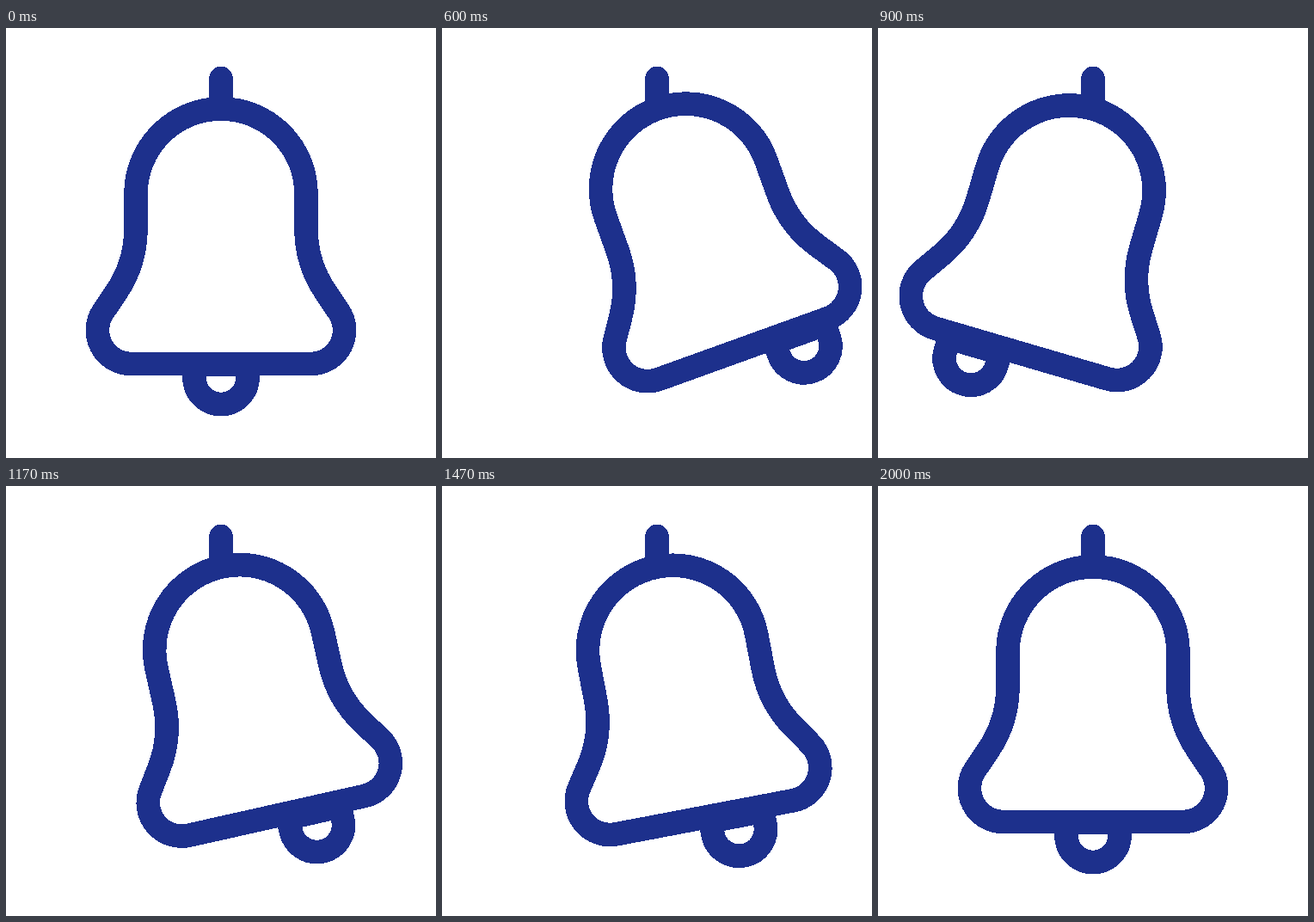
An HTML page for the animation above (2100 ms loop, 500 by 500 pixels).

```html
<!DOCTYPE html>
<html lang="en">
<head>
<meta charset="utf-8">
<title>Ringing bell</title>
<style>
  html, body { margin: 0; width: 100%; height: 100%; overflow: hidden; background: #fff; }
  svg { display: block; width: 100%; height: 100%; }
  path { fill: none; stroke: #1d308c; stroke-width: 27.6; shape-rendering: crispEdges; }
</style>
</head>
<body>
<svg viewBox="0 0 500 500">
  <path d="M250 94V58.5" stroke-linecap="round"/>
  <g id="bell">
    <path id="clapper" d="M219 391H281V406.5A31 31 0 0 1 219 406.5Z"/>
    <path d="M250 94A99 99 0 0 1 349 193V233A132 132 0 0 0 371.6 307L386.9 329.7
             A39 39 0 0 1 354.5 390.5H145.5A39 39 0 0 1 113.1 329.7L128.4 307
             A132 132 0 0 0 151 233V193A99 99 0 0 1 250 94Z"/>
  </g>
</svg>
<script>
  const LOOP = 2100, FPS = 30;
  const bell = document.getElementById('bell');
  const clapper = document.getElementById('clapper');

  // pose: [bell angle, clapper x, clapper y]
  const REST = [0, 0, 0], RIGHT = [-20, 68, 5], LEFT = [20, -67, 6];
  const keys = [
    [333.3, REST], [580, RIGHT], [826.7, LEFT], [1073.3, RIGHT],
    [1320, LEFT], [1566.7, RIGHT], [2000, REST]
  ];

  // cubic-bezier(PULL, 0, 1 - PULL, 1)
  const PULL = 0.72;
  function ease(x) {
    let lo = 0, hi = 1;
    for (let i = 0; i < 30; i++) {
      const s = (lo + hi) / 2, r = 1 - s;
      const bx = 3 * s * r * (PULL * r + (1 - PULL) * s) + s * s * s;
      if (bx < x) lo = s;
      else hi = s;
    }
    return lo * lo * (3 - 2 * lo);
  }

  function poseAt(t) {
    const next = keys.findIndex(([time]) => time > t);
    if (next < 1) return REST;
    const [t0, from] = keys[next - 1], [t1, to] = keys[next];
    const p = ease((t - t0) / (t1 - t0));
    return from.map((v, i) => v + (to[i] - v) * p);
  }

  function draw(now) {
    // hold each pose for one step of the frame rate
    const step = Math.floor((now % LOOP + 4) * FPS / 1000);
    const [angle, x, y] = poseAt(step * 1000 / FPS);
    bell.setAttribute('transform', `rotate(${angle} 250 94)`);
    clapper.setAttribute('transform', `translate(${x} ${y})`);
  }

  const start = performance.now();
  function tick() {
    draw(performance.now() - start);
    requestAnimationFrame(tick);
  }
  tick();
</script>
</body>
</html>
```
